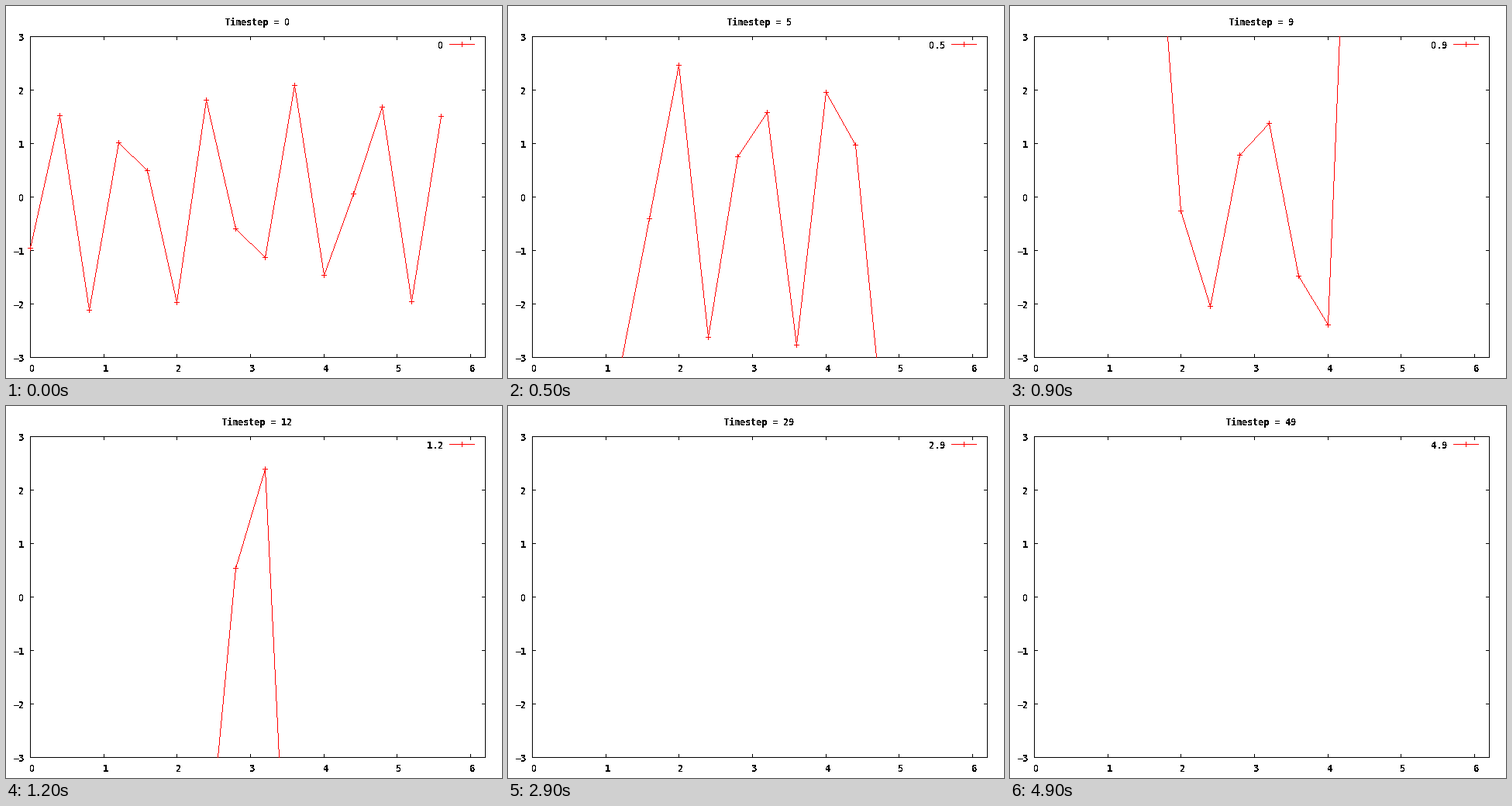
Write a matplotlib script that moves like this. It is 640 px wide and 480 px high and loops after 5000 ms.

```python
import numpy as np
import matplotlib.pyplot as plt
from matplotlib.animation import FuncAnimation

plt.rcParams["text.antialiased"] = False

WIDTH, HEIGHT = 640, 480
LEFT, RIGHT, TOP, BOTTOM = 31, 618, 39, 453
X_MAX, Y_MAX = 6.2, 3
BLACK, RED = (0, 0, 0), (255, 0, 0)
PX = 0.72                      # points per pixel at 100 dpi
CELL = 7                       # character pitch in pixels
STEPS, DT, DX, COUNT = 50, 0.1, 0.4, 15

fig = plt.figure(figsize=(WIDTH / 100, HEIGHT / 100), dpi=100, facecolor="white")
ax = fig.add_axes([0, 0, 1, 1])
ax.axis("off")


def nearest(value):
    return np.floor(np.asarray(value) + 0.5).astype(int)


def col(x):
    return nearest(LEFT + x * (RIGHT - LEFT) / X_MAX)


def row(y):
    return nearest((TOP + BOTTOM) / 2 - y * (BOTTOM - TOP) / (2 * Y_MAX))


def line(canvas, x0, y0, x1, y1, color):
    """One-pixel line without smoothing, both ends included."""
    count = max(abs(x1 - x0), abs(y1 - y0)) + 1
    canvas[nearest(np.linspace(y0, y1, count)),
           nearest(np.linspace(x0, x1, count))] = color


def plus(canvas, x, y):
    line(canvas, x - 3, y, x + 3, y, RED)
    line(canvas, x, y - 3, x, y + 3, RED)


def write(text, x, baseline):
    """Fixed-pitch text whose last character is centred on x."""
    last = len(text) - 1
    return [ax.text(x - CELL * (last - i), baseline, char, ha="center",
                    va="baseline", weight="bold", size=12.3 * PX,
                    family="Liberation Sans" if char == "0" else "DejaVu Sans Mono")
            for i, char in enumerate(text) if char != " "]


def laplacian(u):
    return (np.roll(u, 1) - 2 * u + np.roll(u, -1)) / DX**2


def draw_curve(canvas, u):
    inside = np.abs(u) <= Y_MAX
    for i in range(COUNT - 1):
        # A segment shows only when at least one of its ends is in range.
        if inside[i] or inside[i + 1]:
            y = np.clip(u[i:i + 2], -Y_MAX, Y_MAX)
            x = grid[i] + (y - u[i]) * DX / (u[i + 1] - u[i])
            (x0, x1), (y0, y1) = col(x), row(y)
            line(canvas, x0, y0, x1, y1, RED)
    for x, y in zip(col(grid[inside]), row(u[inside])):
        plus(canvas, x, y)


# Explicit heat equation on a ring; the time step is too long to be stable.
grid = DX * np.arange(COUNT)
history = [DT * laplacian(np.sin(grid) + np.sin(10 * grid))]
for _ in range(STEPS - 1):
    history.append(history[-1] + DT * laplacian(history[-1]))

# Border, ticks, scale and key sample
backdrop = np.full((HEIGHT, WIDTH, 3), 255, dtype=np.uint8)
for y in (TOP, BOTTOM):
    line(backdrop, LEFT, y, RIGHT, y, BLACK)
for x in (LEFT, RIGHT):
    line(backdrop, x, TOP, x, BOTTOM, BLACK)
for value in range(7):
    x = col(value)
    line(backdrop, x, BOTTOM, x, BOTTOM - 4, BLACK)
    line(backdrop, x, TOP, x, TOP + 4, BLACK)
    write(str(value), x + 3, 472)
for value in range(-Y_MAX, Y_MAX + 1):
    y = row(value)
    line(backdrop, LEFT, y, LEFT + 4, y, BLACK)
    line(backdrop, RIGHT, y, RIGHT - 4, y, BLACK)
    write(str(value).replace("-", "\u2212"), 20, y + 6)
line(backdrop, 572, 49, 604, 49, RED)
plus(backdrop, 588, 49)

picture = ax.imshow(backdrop, extent=(0, WIDTH, HEIGHT, 0), aspect="auto",
                    interpolation="nearest")
labels = []


def draw(step):
    canvas = backdrop.copy()
    draw_curve(canvas, history[step])
    picture.set_data(canvas)

    for label in labels:
        label.remove()
    labels[:] = (write(f"Timestep = {step}", 363 if step < 10 else 366, 25)
                 + write(f"{step / 10:g}", 561, 55))
    return [picture, *labels]


anim = FuncAnimation(fig, draw, frames=STEPS, interval=100, repeat=True)
plt.show()
```
